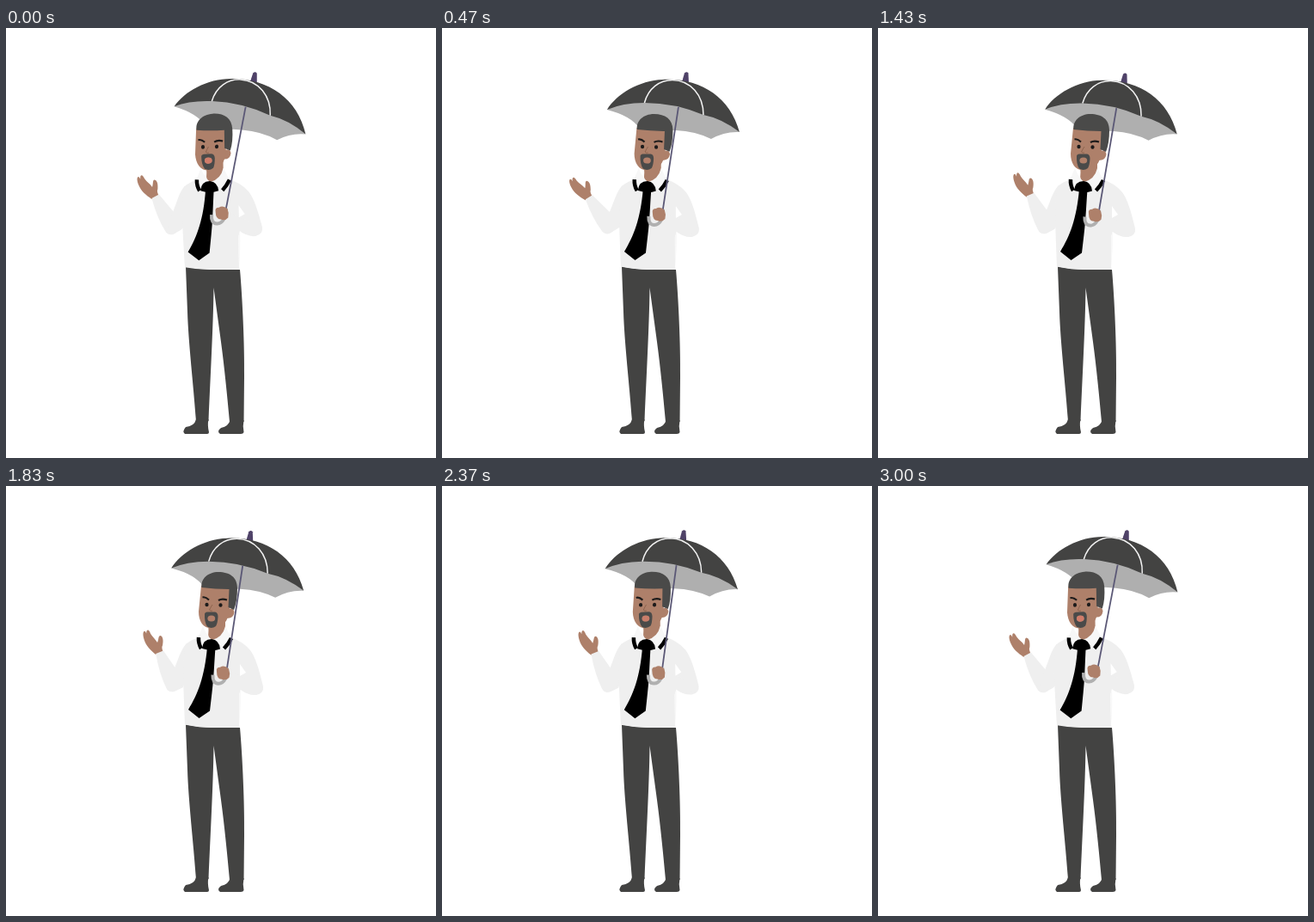
An HTML page with a canvas for the animation above (3030 ms loop, 500 px wide and 500 px high).

```html
<!DOCTYPE html>
<html lang="en">
<head>
<meta charset="utf-8">
<title>Man with umbrella</title>
<style>
html, body { margin: 0; width: 100%; height: 100%; overflow: hidden; background: #fff; }
canvas { display: block; width: 500px; height: 500px; }
</style>
</head>
<body>
<canvas id="stage" width="500" height="500"></canvas>
<script>
const ctx = document.getElementById('stage').getContext('2d');
const LOOP = 3030, SPAN = 3000, STEP = 100 / 3;
const DARK = '#434342', HAIR = '#4a4a49', SKIN = '#ae806a', SHIRT = '#efefef', INK = '#1d1b1b';

// Smooth periodic curve through [time, value] pairs, without overshoot.
function track(keys) {
  const n = keys.length - 1;
  const slope = i => {
    const a = keys[(i + n) % n], b = keys[(i + n) % n + 1];
    return (b[1] - a[1]) / (b[0] - a[0]);
  };
  const tangent = i => {
    const a = slope(i - 1), b = slope(i % n);
    return a * b <= 0 ? 0 : 2 * a * b / (a + b);
  };
  return t => {
    let i = 0;
    while (i < n - 1 && t >= keys[i + 1][0]) i++;
    const [t0, v0] = keys[i], [t1, v1] = keys[i + 1];
    const d = t1 - t0, u = (t - t0) / d, w = 1 - u;
    return v0 * (1 + 2 * u) * w * w + v1 * u * u * (3 - 2 * u)
      + d * u * w * (tangent(i) * w - tangent(i + 1) * u);
  };
}

const pose = {
  torso: track([[0, -1.15], [470, -.12], [930, 0], [1830, 0], [2370, -.6], [SPAN, -1.15]]),
  head: track([[0, -2.4], [470, -.2], [930, 0], [1830, 0], [2370, -1.4], [SPAN, -2.4]]),
  forearm: track([[0, 6], [470, 0], [700, -2.5], [930, .9], [1430, 8.4], [1830, 10.3],
    [2100, 10.9], [2370, 10.5], [2700, 7.7], [SPAN, 6]]),
  umbrella: track([[0, 2.3], [500, 0], [1150, 1.4], [1830, .1], [2300, -.9], [SPAN, 2.3]]),
  lift: track([[0, -1.2], [470, 0], [930, .7], [1830, .7], [2370, .6], [SPAN, -1.2]]),
  mouth: track([[0, 1], [470, .15], [930, .3], [1430, .1], [1830, .15], [2370, .8], [SPAN, 1]])
};

const P = d => new Path2D(d);
const shapes = {
  legs: P('M209 277.5 Q225 281 241 281 L272 281 C275 315 277.5 370 277 405 L276.5 458 L260 458 ' +
    'C257 425 254 395 250 365 L241.5 302 C241 345 238 400 235.5 457 L221 457 C218 415 212 365 211 330Z'),
  shoes: P('M221 455 L235.5 455 Q234 462 236 470 Q236 472 234 472 L208 472 Q204.5 469 209 464 Q219 463 221 455Z ' +
    'M260.5 456 L276.5 456 Q275 463 276.5 470 Q276 472 273 472 L249 472 Q244.5 469 250 465 Q259 463 260.5 456Z'),
  upperArm: P('M210 183 C203 190 200 203 195 214 L187 236 Q190 241 196 238 L208 231 L216 190Z'),
  forearm: P('M167 199 L175 194 L195 214 L207 214 L205 232 L196 238.5 Q190 241 186 236 Q175 221 167 199Z'),
  palm: P('M167 200 C160 196 154 192 150.5 185 C148 180 147.5 176 149.5 175.5 Q150.5 175.5 152 178 ' +
    'Q151 173.5 153.5 173.5 Q155 174 157 177.5 C160 181 163 182 166.5 186 ' +
    'C167.5 182 166 178 168.5 177.5 C172 178 173 183 173 188 C172 191 174 193 175 196Z'),
  torso: P('M228 175 Q216 178 209 184 C204 205 207 240 208 277.5 Q225 281 241 281 L271 281 L271 243 L273 236 ' +
    'Q281 244 291 243 Q300 241 299 233 C294 212 290 199 284 191 Q275 180 258 175Z'),
  cuff: P('M271 243 L271 280 Q273 262 273 237Z'),
  gap: P('M272 207 L279 217 L272 221Z'),
  neck: P('M235 158 L255 148 L255 165 Q255 176 240 181 Q234 178 235.5 168Z'),
  collar: P('M229 163 Q233 174 239.5 179 Q231 182 226.5 190 Q221 184 223 177Z ' +
    'M255 163 L262 177 L253 190 Q248 181 239.5 179 Q252 176 255 163Z'),
  band: P('M224 176 Q223.5 183 227 189 M262 177 Q258.5 184 253.5 189'),
  knot: P('M228 189 Q229 178 239 178 Q248 179 249 189.5 Q240 193 228 189Z'),
  tie: P('M234 187 L243.5 188 C242 208 241.5 225 239.5 240 L237 261.5 L224.5 270 L212 260 C223 242 231 222 234 187Z'),
  under: P('M192 95 Q208 86 236 83 Q275 88 304 99 Q330 107 346 121 Q329 120 313 129 ' +
    'Q295 120 272 119 Q250 119 230 117 Q220 102 192 95Z'),
  canopy: P('M192 95 C203 77 229 61 257 60 C300 58 335 80 346 121 Q325 105 304 101 Q271 87 235.5 87 Q210 87 192 95Z'),
  rib: P('M235.5 87 C240 70 253 60.5 268 60.5 C289 61 304 78 304 101'),
  tip: P('M279 63 L282 52.5 Q284.5 50 286.5 52.5 L287 64Z'),
  shaft: P('M275 92 L257 211'),
  hook: P('M257 211 C258 220 254 229 247 229 Q240 229 240.5 219'),
  fist: P('M245 215 Q244 210 249 210 Q254 207 259 212 Q261 217 259.5 222 Q256 226 251 224 Q245 224 245 215Z'),
  sleeve: P('M258 212 L272 221 Q287 225 292 239 Q283 245 273 237 L258 222Z'),
  face: P('M227 116 L262 118 L260 143 C259 158 251 165.5 239 165.5 C229 165.5 224 157 224 146Z'),
  ear: P('M257 144 Q264.5 140 265.5 147 Q264 155 256 153.5Z'),
  hair: P('M227.5 118 C226 108 235 100 247 100 C260 100 269 106 269 119 Q269 134 265 144 ' +
    'L258.5 141 L259.5 120 Q243 120 227.5 118Z'),
  brows: P('M228.5 129.5 Q232 128.5 236 132.5 M247 133 Q251 130.5 257 132.5'),
  nose: P('M240 138 Q238 141 236.5 144 Q238 146 240 145'),
  beard: P('M231 149 Q231 147 234 146.5 L243 146.5 Q246.5 147 246.5 152 Q246 160 244 163 ' +
    'Q239 166.5 234 163.5 Q230.5 158 231 149Z')
};

function fill(name, color) {
  ctx.fillStyle = color;
  ctx.fill(shapes[name]);
}

function line(name, color, width) {
  ctx.strokeStyle = color;
  ctx.lineWidth = width;
  ctx.stroke(shapes[name]);
}

function oval(x, y, rx, ry, color) {
  ctx.fillStyle = color;
  ctx.beginPath();
  ctx.ellipse(x, y, rx, ry, 0, 0, Math.PI * 2);
  ctx.fill();
}

function turned(x, y, deg, paint) {
  ctx.save();
  ctx.translate(x, y);
  ctx.rotate(deg * Math.PI / 180);
  ctx.translate(-x, -y);
  paint();
  ctx.restore();
}

function drawArm(angle) {
  turned(193, 237, angle, () => {
    fill('palm', SKIN);
    fill('forearm', SHIRT);
  });
  fill('upperArm', SHIRT);
}

function drawTorso() {
  fill('torso', SHIRT);
  fill('cuff', '#f8f8f8');
  fill('gap', '#fff');
  fill('neck', SKIN);
  fill('collar', '#f7f7f7');
  line('band', '#000', 4.5);
  fill('tie', '#000');
  fill('knot', '#000');
}

function drawUmbrella() {
  fill('under', '#afafaf');
  fill('tip', '#4f4268');
  fill('canopy', DARK);
  line('rib', '#f2f2f2', 1.5);
  line('hook', '#b0b0b0', 4);
  line('shaft', '#5b5876', 1.8);
}

function drawHead(open) {
  fill('ear', SKIN);
  fill('face', SKIN);
  fill('hair', HAIR);
  line('brows', INK, 2.1);
  oval(233.5, 138, 2.1, 2.3, INK);
  oval(249.5, 138.5, 2.1, 2.3, INK);
  line('nose', '#8a614c', .9);
  fill('beard', HAIR);
  oval(238.8, 154, 4.4, 3.6, SKIN);
  ctx.globalAlpha = open;
  oval(238.8, 154.2, 4.3, 3.4, '#d07c6a');
  ctx.globalAlpha = 1;
}

function draw(t) {
  const at = name => pose[name](t);
  const lean = at('torso');
  ctx.fillStyle = '#fff';
  ctx.fillRect(0, 0, 500, 500);
  fill('legs', DARK);
  fill('shoes', DARK);
  turned(240, 280, lean, () => {
    drawArm(at('forearm'));
    drawTorso();
    fill('sleeve', SHIRT);
    ctx.save();
    ctx.translate(0, at('lift'));
    turned(251, 216, at('umbrella') - lean, drawUmbrella);
    fill('fist', SKIN);
    ctx.restore();
    turned(238, 178, at('head'), () => drawHead(at('mouth')));
  });
}

function tick() {
  const t = performance.now() % LOOP;
  draw(Math.min(SPAN, Math.floor(t / STEP + .2) * STEP));
  requestAnimationFrame(tick);
}
tick();
</script>
</body>
</html>
```
